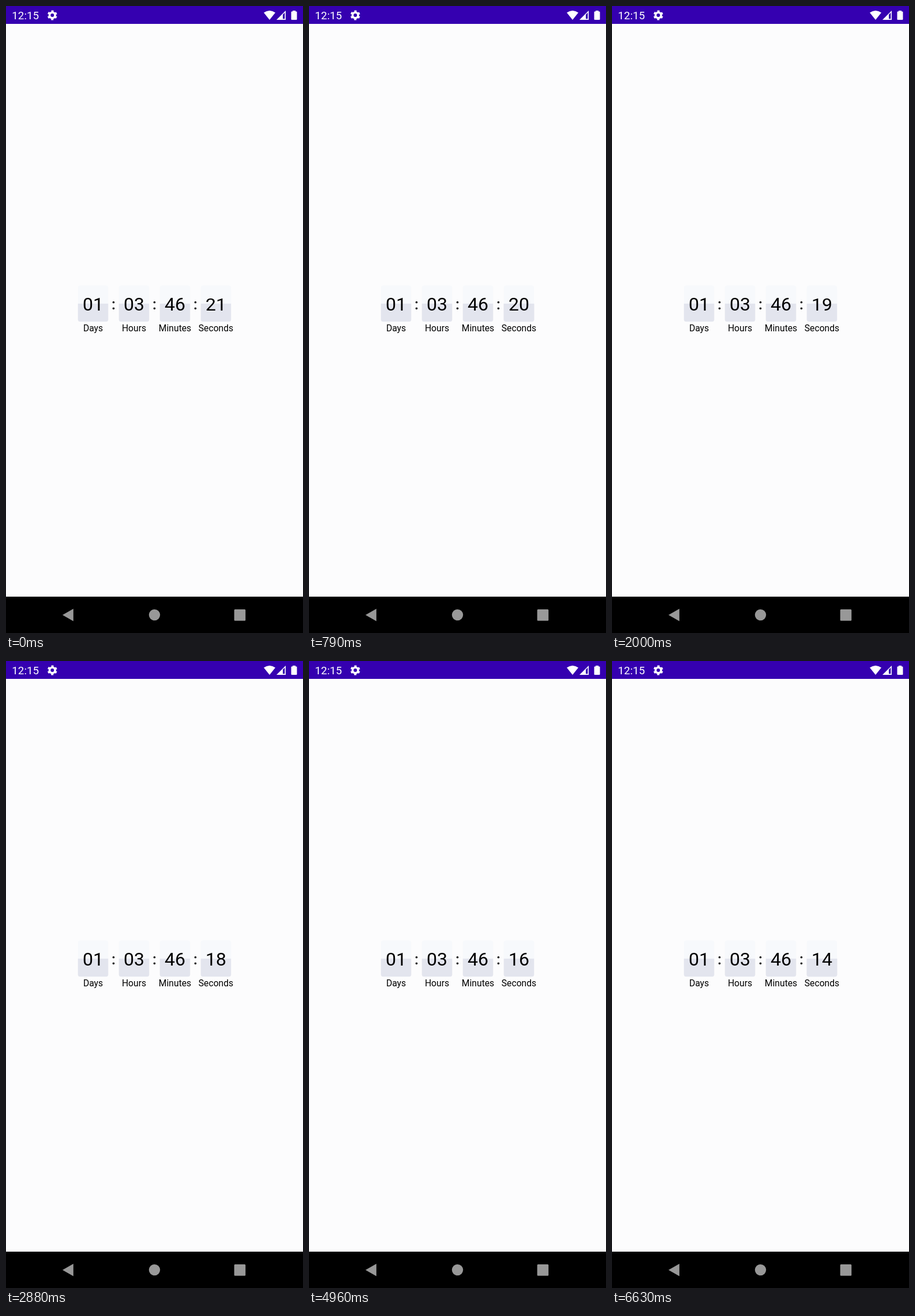
An HTML page for the animation above (6670 ms loop, 515 by 1087 pixels).

```html
<!DOCTYPE html>
<html lang="en">
<head>
<meta charset="utf-8">
<title>Countdown</title>
<style>
  html, body { margin: 0; width: 100%; height: 100%; overflow: hidden; background: #fcfcfd; }
  svg { display: block; width: 515px; height: 1087px; font-family: Roboto, sans-serif; }
  text { fill: #000; text-anchor: middle; }
  .digits { font-size: 32px; }
  .label { font-size: 15.7px; }
  .colon { font-size: 26px; font-weight: 500; }
  .upper { fill: #f7f9fc; }
  .lower { fill: #e3e5ee; }
  .status, .status text { fill: #fff; }
  .status text { font-size: 18.8px; text-anchor: start; }
  .nav { fill: #989898; }
</style>
</head>
<body>
<svg viewBox="0 0 515 1087">
  <defs>
    <path id="upper" d="M-26.3 0V-27.5a4 4 0 0 1 4-4H22.3a4 4 0 0 1 4 4V0Z"/>
    <path id="lower" d="M-26.3 0V27.2a4 4 0 0 0 4 4H22.3a4 4 0 0 0 4-4V0Z"/>
    <clipPath id="clip-upper"><use href="#upper"/></clipPath>
    <clipPath id="clip-lower"><use href="#lower"/></clipPath>
  </defs>

  <rect width="515" height="1087" fill="#fcfcfd"/>
  <rect width="515" height="31" fill="#3500b0"/>
  <g class="status">
    <text x="10.3" y="23">12:15</text>
    <g transform="translate(80.3 16)" fill="none" stroke="#fff">
      <circle r="4.8" stroke-width="3.6"/>
      <circle r="6.9" stroke-width="3.2" stroke-dasharray="3.7 3.525" stroke-dashoffset="-1.76"/>
    </g>
    <path d="M447 11.6Q457 4.6 467 11.6L457 24Z"/>
    <path fill-rule="evenodd" d="M469 24L485 8V24ZM480 14.9V22.3H483.4V11.5Z"/>
    <path d="M497 9.6V8H502V9.6H503.4Q504.5 9.6 504.5 10.8V22.8Q504.5 24 503.4 24H495.6Q494.5 24 494.5 22.8V10.8Q494.5 9.6 495.6 9.6Z"/>
  </g>

  <g id="clock"></g>

  <rect y="1024" width="515" height="63"/>
  <g class="nav">
    <path d="M98 1055.7L116.8 1045V1066.5Z"/>
    <circle cx="257.5" cy="1055.6" r="9.7"/>
    <rect x="395.7" y="1046" width="19.6" height="19.8" rx="1.5"/>
  </g>
</svg>
<script>
const LOOP = 6670, TICK = 1000, FLIP = 500, LEAD = 140, FIRST = 21;
const clock = document.getElementById('clock');

function add(parent, tag, attrs, text = '') {
  const node = document.createElementNS('http://www.w3.org/2000/svg', tag);
  for (const key in attrs) node.setAttribute(key, attrs[key]);
  node.textContent = text;
  return parent.appendChild(node);
}

// One half of a card, hinged on the card's middle line
function addHalf(card, side, value) {
  const group = add(card, 'g', {});
  add(group, 'use', { href: '#' + side, class: side });
  const clipped = add(group, 'g', { 'clip-path': `url(#clip-${side})` });
  const text = add(clipped, 'text', { class: 'digits', y: 12 }, value);
  return { group, text };
}

function addCard(x, label, value) {
  const card = add(clock, 'g', { transform: `translate(${x} 516)` });
  const upper = addHalf(card, 'upper', value);
  const lower = addHalf(card, 'lower', value);
  add(card, 'text', { class: 'label', y: 48 }, label);
  return { card, upper, lower };
}

const units = [['Days', '01'], ['Hours', '03'], ['Minutes', '46'], ['Seconds', FIRST]];
const cards = units.map(([label, value], i) => addCard(151 + 71 * i, label, value));
for (let i = 0; i < 3; i++) add(clock, 'text', { class: 'colon', x: 186.5 + 71 * i, y: 525.5 }, ':');

const seconds = cards[3];
const flapUpper = addHalf(seconds.card, 'upper', '');
const flapLower = addHalf(seconds.card, 'lower', '');

function turn(flap, angle, value) {
  const scale = Math.max(0, Math.cos(angle));
  flap.group.setAttribute('transform', `scale(1 ${scale.toFixed(4)})`);
  flap.group.setAttribute('visibility', scale > 0.001 ? 'visible' : 'hidden');
  flap.text.textContent = value;
}

function draw(now) {
  const t = now % LOOP + LEAD;
  const before = FIRST - Math.floor(t / TICK);
  const after = before - 1;
  const p = Math.min(1, t % TICK / FLIP);
  const fall = Math.min(1, 2 * p) ** 2;
  const land = (1 - Math.max(0, 2 * p - 1)) ** 2;

  seconds.upper.text.textContent = after;
  seconds.lower.text.textContent = before;
  turn(flapUpper, fall * Math.PI / 2, before);
  turn(flapLower, land * Math.PI / 2, after);
}

function frame() {
  draw(performance.now());
  requestAnimationFrame(frame);
}
frame();
</script>
</body>
</html>
```
